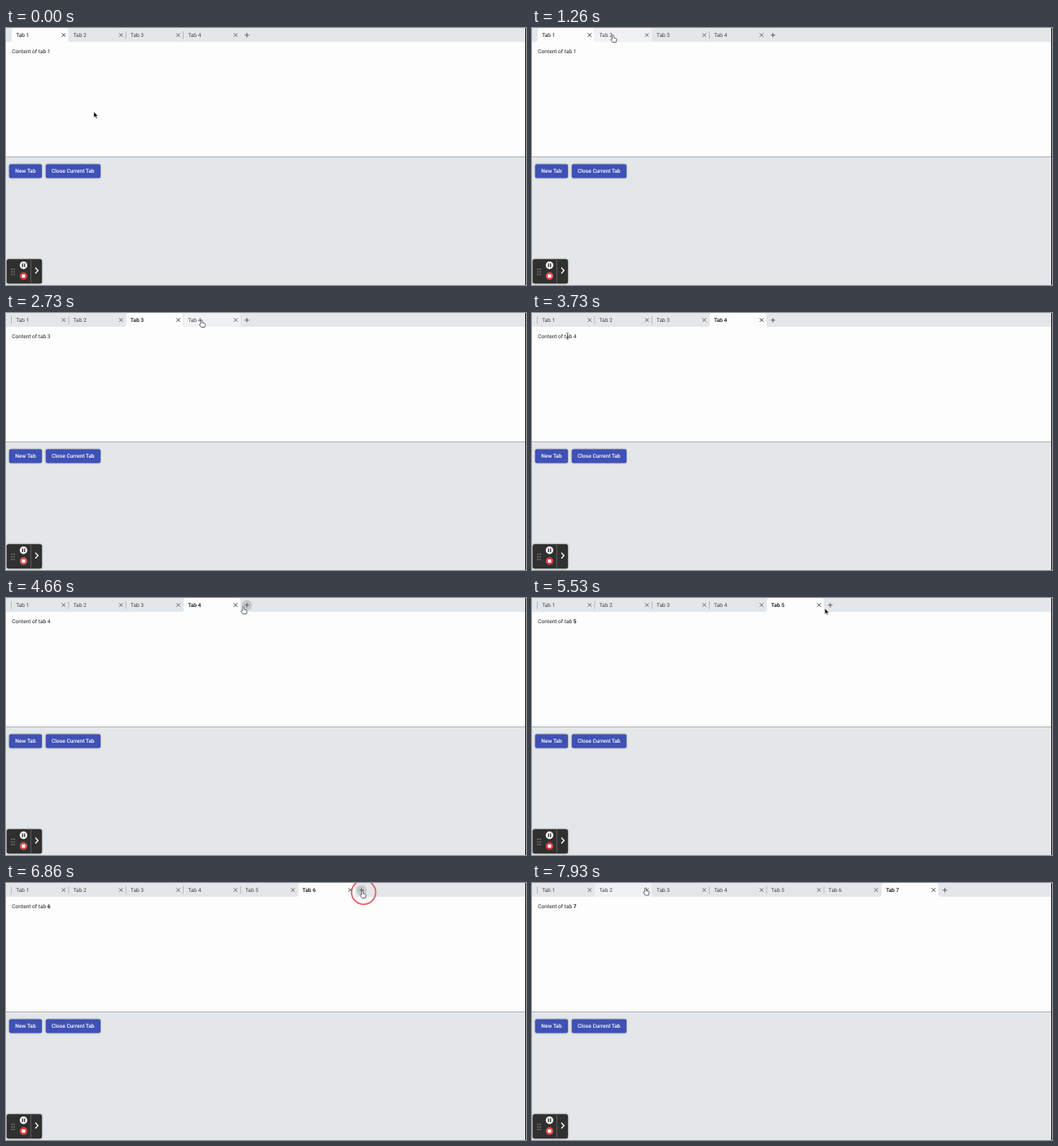
Write an HTML page that moves like this. It is 638x316 px and loops after 8000 ms.

```html
<!DOCTYPE html>
<html lang="en">
<head>
<meta charset="utf-8">
<title>Tabs</title>
<style>
html, body { margin: 0; width: 100%; height: 100%; overflow: hidden; background: #e4e7e9; }
svg { display: block; width: 638px; height: 316px; font: 6.6px Roboto, sans-serif; text-rendering: geometricPrecision; }
.button { fill: #3f51b5; filter: drop-shadow(0 .7px .8px #0005); }
.label { fill: #fff; font-weight: 500; text-anchor: middle; }
.icon { fill: none; stroke: #444; stroke-width: .8; }
.recorder { fill: #303030; filter: drop-shadow(0 0 1px #0006); }
</style>
</head>
<body>
<svg viewBox="0 0 638 316">
  <rect y="17" width="638" height="141" fill="#fdfdfd"/>
  <path d="M0 158.5H638" stroke="#aeb0b1"/>
  <rect class="button" x="3.8" y="167.4" width="40.3" height="17.2" rx="2"/>
  <rect class="button" x="48.8" y="167.4" width="67.2" height="17.2" rx="2"/>
  <text class="label" x="24" y="178.4">New Tab</text>
  <text class="label" x="82.3" y="178.4">Close Current Tab</text>
  <g id="tabs"></g>
  <text x="7.3" y="31.4" fill="#222">Content of tab <tspan id="number"></tspan></text>
  <rect class="recorder" x=".8" y="284.3" width="43.3" height="30" rx="2.5"/>
  <path d="M7.2 296v9M10 296v9" stroke="#aaa" stroke-width="1.2" stroke-dasharray="1.2 2.1"/>
  <circle cx="21.5" cy="291.7" r="4.7" fill="#f4f4f4"/>
  <path d="M20.3 289.5v4.4M22.8 289.5v4.4" stroke="#222" stroke-width="1.2"/>
  <circle id="stop" cx="21.5" cy="305" r="4.7"/>
  <rect x="19.5" y="303" width="4" height="4" rx=".6" fill="#fff"/>
  <path d="M30.5 285v29" stroke="#666" stroke-width=".8"/>
  <path d="M36 294.8l3.3 3.5-3.3 3.5" fill="none" stroke="#fff" stroke-width="1.3"/>
  <path d="M637.5 0v316" stroke="#111"/>
  <g id="pointer"></g>
</svg>
<script>
const LOOP = 8000, LEFT = 6.5, WIDTH = 70.33, BAR = 17;
const RIPPLE = 200, DELAY = 130, SAG = 8;
const $ = id => document.getElementById(id);

const tabLeft = n => LEFT + (n - 1) * WIDTH;
const plusX = count => tabLeft(count + 1) + 7.8;
const onLabel = n => ({ x: tabLeft(n) + 22.5, y: 8.5 });
const onClose = n => ({ x: tabLeft(n) + 62.5, y: 6 });
const onAdd = count => ({ x: plusX(count) + 1, y: 9.5 });

// The pointer rests between moves; each click opens the next tab.
const home = { x: 107.7, y: 103 };
const moves = [
  { from: 60, to: 800, end: { x: 100, y: 17.2 } },
  { from: 1000, to: 1260, end: onLabel(2) },
  { from: 1660, to: 2200, end: onLabel(3) },
  { from: 2450, to: 2730, end: onLabel(4) },
  { from: 3000, to: 3730, end: { x: 43.4, y: 28.5 } },
  { from: 3860, to: 4800, end: onAdd(4) },
  { from: 5130, to: 5730, end: onAdd(5) },
  { from: 6060, to: 6660, end: onAdd(6) },
  { from: 7260, to: 7930, end: onClose(2) }
];
const clicks = [1460, 2330, 2860, 5000, 5930, 6800];

const shapes = {
  arrow: '<path d="M0 0V7.3L1.7 5.8 2.9 8.4 4.1 7.8 2.9 5.3H5.2Z" fill="#000" stroke="#fff" stroke-width=".6"/>',
  hand: '<path d="M-1 5V1a1 1 0 0 1 2 0V3.6l2.5 .5q1 .3 1 1.5L3.8 9H-.4L-2.8 5.6Q-2.2 4.2-1 5.2Z" fill="#fff" stroke="#444" stroke-width=".8"/>',
  beam: '<path d="M-1.6-4Q0-4 0-3Q0-4 1.6-4M0-3V3M-1.6 4Q0 4 0 3Q0 4 1.6 4" fill="none" stroke="#444" stroke-width=".7"/>'
};

// Slows toward the end of each move, along a slightly sagging line.
function pointerAt(t) {
  let { x, y } = home;
  for (const { from, to, end } of moves) {
    if (t < from) break;
    const u = Math.min(1, (t - from) / (to - from)), k = u * (2 - u);
    x += (end.x - x) * k;
    y += (end.y - y) * k + SAG * 4 * k * (1 - k);
  }
  return { x, y };
}

function tab(n, active, hover) {
  const on = n === active, lit = i => i === active || i === hover;
  const ink = on ? '#111' : '#444';
  const back = lit(n)
    ? `<path d="M-2 17Q.5 17 .5 14V3Q.5 0 3.5 0H67Q70 0 70 3V14Q70 17 72.5 17Z" fill="${on ? '#fdfdfd' : '#eff1f4'}"/>`
    : lit(n - 1) ? '' : '<path d="M0 4V13.5" stroke="#aaadb0" stroke-width=".8"/>';
  return `<g transform="translate(${tabLeft(n)})">${back}
    <text x="5.7" y="11.2" fill="${ink}" font-weight="${on && n > 1 ? 500 : 400}">Tab ${n}</text>
    <path class="icon" style="stroke:${ink}" d="M62 6.4l4.4 4.4m0-4.4l-4.4 4.4"/></g>`;
}

function draw(now) {
  const t = now % LOOP, { x, y } = pointerAt(t);
  const active = 1 + clicks.filter(at => t >= at + DELAY).length;
  const count = Math.max(4, active), plus = plusX(count);
  const index = Math.floor((x - LEFT) / WIDTH) + 1;
  const hover = y < BAR && index <= count ? index : -1;
  const onPlus = Math.hypot(x - plus, y - 8.8) < 6.5;

  let bar = '';
  for (let n = 1; n <= count; n++) if (n !== active) bar += tab(n, active, hover);
  bar += tab(active, active, hover);
  if (onPlus) bar += `<circle cx="${plus}" cy="8.8" r="6.4" fill="#c6c8ca"/>`;
  $('tabs').innerHTML = bar + `<path class="icon" d="M${plus - 2.8} 8.8h5.6m-2.8-2.8v5.6"/>`;

  $('number').textContent = active;
  $('number').setAttribute('font-weight', active > 4 ? 700 : 400);
  const pale = 12 - 12 * Math.cos(t / 1830 * 2 * Math.PI);
  $('stop').setAttribute('fill', `rgb(218,${58 + pale},${60 + pale})`);

  const onText = x < 55 && y > 24 && y < 34;
  const kind = hover > 0 || onPlus ? 'hand' : onText ? 'beam' : 'arrow';
  const pressed = clicks.some(at => t >= at && t < at + RIPPLE);
  $('pointer').setAttribute('transform', `translate(${x} ${y})`);
  $('pointer').innerHTML = shapes[kind] +
    (pressed ? '<circle cx="1.5" cy="2" r="14.8" fill="none" stroke="#e06468" stroke-width="1.8"/>' : '');
}

const start = performance.now();
function tick() {
  draw(performance.now() - start);
  requestAnimationFrame(tick);
}
tick();
</script>
</body>
</html>
```
